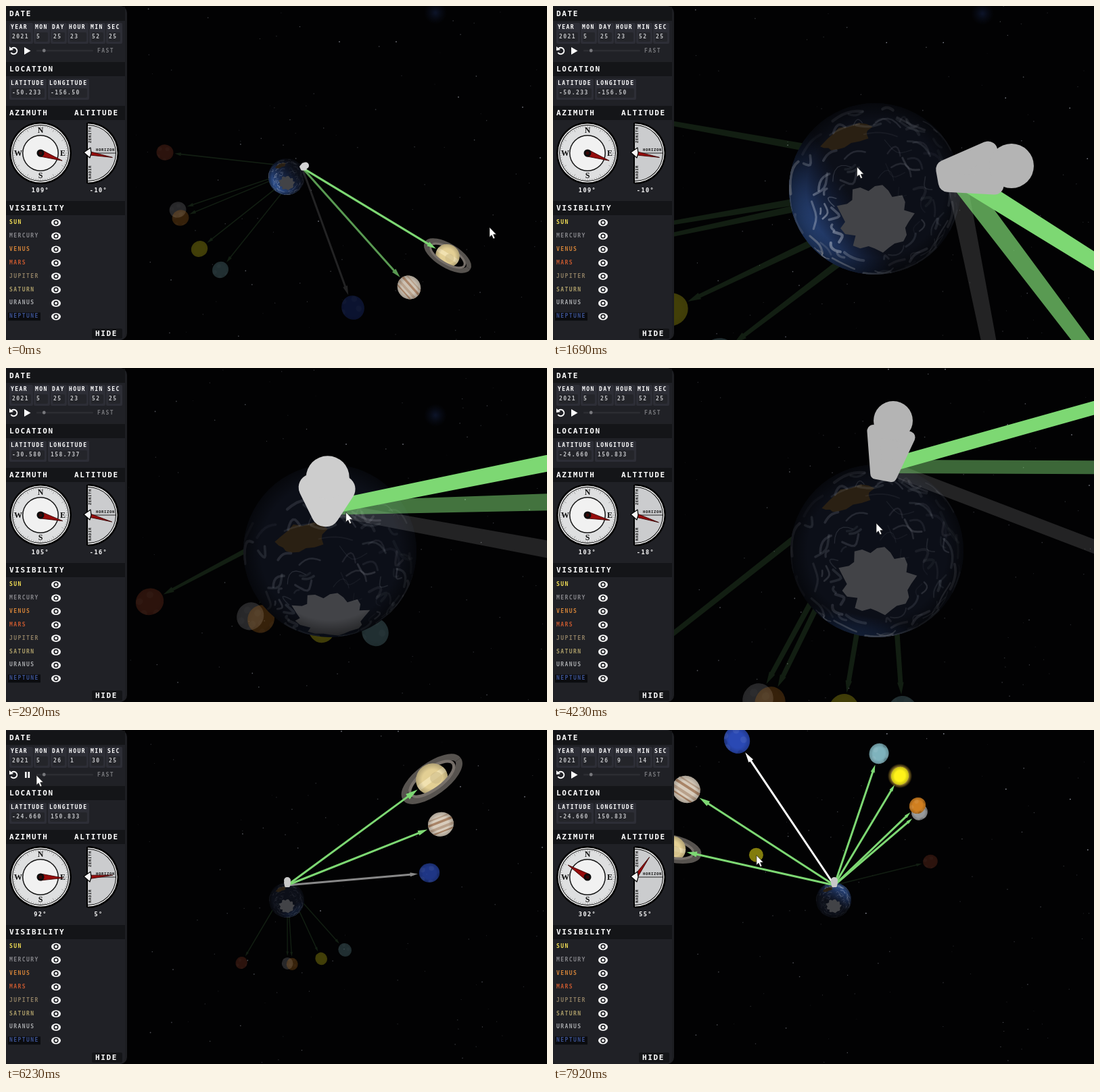
Write an HTML page with a canvas that moves like this. It is 800 px wide and 495 px high and loops after 8000 ms.

```html
<!DOCTYPE html>
<html lang="en">
<head>
<meta charset="utf-8">
<title>Planet finder</title>
<style>
html, body { margin: 0; width: 100%; height: 100%; overflow: hidden; background: #000; }
canvas { display: block; }
</style>
</head>
<body>
<canvas id="stage" width="800" height="495"></canvas>
<script>
const ctx = document.getElementById('stage').getContext('2d');
const LOOP = 8000, STEP = LOOP / 104, RAD = Math.PI / 180, TAU = Math.PI * 2;
const { sin, cos, atan2, hypot, floor } = Math;
const clamp = (v, a, b) => Math.min(b, Math.max(a, v));
const mix = (a, b, u) => a + (b - a) * u;
const mixAll = (a, b, u) => a.map((v, i) => mix(v, b[i], u));

// Piecewise linear track of rows [time, ...values]
function track(rows, t) {
  let i = 0;
  while (i < rows.length - 2 && t >= rows[i + 1][0]) i++;
  const a = rows[i], b = rows[i + 1];
  return mixAll(a, b, clamp((t - a[0]) / (b[0] - a[0]), 0, 1)).slice(1);
}

function seeded(s) {
  return () => (s = (s * 16807) % 2147483647) / 2147483647;
}

// ---- timeline ----
const POSE = [[0, 0], [400, 0], [920, 1], [1550, 2], [1700, 2], [2850, 3], [3450, 3], [4150, 4], [4300, 4], [5050, 5]];
const MINUTES = [[0, 0], [5920, 0], [6230, 98], [7300, 562]];
const PLACE = [[0, -50.233, 203.5], [2500, -50.233, 203.5], [2920, -26.387, 149.187], [3300, -24.66, 150.833]];
const CURSOR = [[0, 715, 328], [120, 715, 328], [600, 436, 233], [1550, 436, 233], [1690, 465, 245],
  [2300, 470, 330], [2500, 590, 250], [2920, 484, 206], [3300, 484, 208], [3500, 480, 310], [4100, 478, 230],
  [5120, 478, 230], [5750, 28, 61], [5950, 28, 61], [6230, 45, 67], [6600, 52, 84], [7000, 44, 78],
  [7250, 28, 61], [7330, 28, 61], [7650, 298, 182], [7920, 302, 187]];
const STARS = [[0, 0, 0], [1600, 0, 0], [2350, 10, 60], [3500, 10, 60], [4150, 3, -51], [7650, 3, -51], [7920, 0, -46]];
const DRAGS = [[1650, 2330], [3500, 4120], [7680, 8000]];

// ---- poses of the scene ----
const GLOBE = [[415, 253, 27], [426, 256, 46], [476, 271, 127], [479, 271, 128], [479, 271, 128], [415, 252, 26]];
const TILT = [22, 22, 22, 54, 22, 22];
const LIGHT = [[.9, .8], [.9, .6], [.85, .36], [.12, .08], [.5, .12], [.3, .3]];
const BEAM = [[3, 3, 1.6], [5.5, 6, 3], [30, 21, 6], [20, 27, 4], [20, 20, 7], [3, 3, 1.5]];
const SIZE = [[18, 12.5], [29, 21], [36, 26], [36, 21], [36, 24], [18, 10]];
// foot x y half, shoulder x y half, head x y r, rounding, grey
const FIGURE = [
  [437, 240, 4, 441, 238, 6, 443, 236.5, 5, 2, 212],
  [462, 237, 7, 472, 232, 11, 477, 229, 10.5, 4, 190],
  [582, 252, 24, 648, 240, 40, 678, 237, 33, 14, 180],
  [472, 215, 21, 474, 178, 42, 475, 162, 32, 20, 205],
  [489, 158, 20, 500, 98, 36, 503, 78, 29, 9, 180],
  [416, 231, 4, 416, 226, 5, 416, 223, 5, 2, 200]];

// ra: degrees east of the sun; at: places in poses 0 to 4; early/late: places while the clock runs
const BODIES = [
  { name: 'mars', ra: 50, dec: 24, color: '#a8482a', at: [235, 217, 142, 199, 60, 153, 213, 347, 100, 455], early: [348, 345], late: [558, 195] },
  { name: 'mercury', ra: 17, dec: 25, color: '#989a9c', at: [254, 302, 165, 333, 120, 331, 362, 368, 303, 491], early: [416, 346], late: [542, 122] },
  { name: 'venus', ra: 12, dec: 24, color: '#d07f20', at: [258, 314, 173, 347, 120, 351, 378, 372, 321, 496], early: [423, 347], late: [539, 112] },
  { name: 'sun', ra: 0, dec: 21, color: '#fff319', at: [286, 360, 222, 422, 174, 450, 468, 386, 430, 507], early: [466, 339], late: [513, 68] },
  { name: 'uranus', ra: -21, dec: 14.7, color: '#7fb3bd', at: [317, 391, 270, 473, 245, 517, 547, 391, 517, 510], early: [501, 326], late: [482, 35] },
  { name: 'neptune', ra: -69, dec: -4, color: '#2a49b4', at: [513, 447, 583, 568, 665, 600, 950, 295, 950, 322], early: [626, 212], late: [272, 15] },
  { name: 'jupiter', ra: -88.5, dec: -12.3, color: '#d8ccbc', at: [596, 417, 716, 520, 860, 600, 1000, 192, 1000, 148], early: [643, 140], late: [197, 88] },
  { name: 'saturn', ra: -111, dec: -18, color: '#e3cf94', at: [653, 370, 808, 443, 1000, 504, 1050, 89, 1000, 3], early: [630, 73], late: [176, 176] }];
const EARLY = 24.5, LATE = 140.5;

// Place of a body in the wide view after the sky has turned by `turn` degrees
function orbit(b, turn) {
  const f = (b.ra + 179.5 - turn) * RAD, d = b.dec * RAD, a = 22 * RAD;
  const x = cos(d) * sin(f);
  const y = sin(d) * sin(a) + cos(d) * cos(f) * cos(a);
  const z = -sin(d) * cos(a) + cos(d) * cos(f) * sin(a);
  const s = 193 / (1 - .77 * z);
  return [416 + s * x, 240 - s * y, s * .073];
}
function wide(b, turn) {
  const p = orbit(b, turn), e = orbit(b, EARLY), l = orbit(b, LATE);
  const u = clamp((turn - EARLY) / (LATE - EARLY), 0, 1);
  for (let i = 0; i < 2; i++) p[i] += mix(b.early[i] - e[i], b.late[i] - l[i], u);
  return p;
}

// Azimuth and altitude seen by the figure
function sight(b, turn, lat) {
  const h = (turn - 180.4 - b.ra) * RAD, d = b.dec * RAD, p = lat * RAD;
  return {
    alt: Math.asin(sin(p) * sin(d) + cos(p) * cos(d) * cos(h)) / RAD,
    az: (atan2(-sin(h) * cos(d), sin(d) * cos(p) - cos(d) * cos(h) * sin(p)) / RAD + 360) % 360
  };
}

// ---- drawing helpers ----
function disc(x, y, r, fill) {
  ctx.beginPath(); ctx.arc(x, y, Math.max(r, 0), 0, TAU);
  ctx.fillStyle = fill; ctx.fill();
}
function poly(pts, fill) {
  ctx.beginPath(); pts.forEach(p => ctx.lineTo(p[0], p[1])); ctx.closePath();
  ctx.fillStyle = fill; ctx.fill();
}
function box(x, y, w, h, fill, r = 0) {
  ctx.beginPath(); ctx.roundRect(x, y, w, h, r);
  ctx.fillStyle = fill; ctx.fill();
}
function label(s, x, y, size, color, align = 'left') {
  ctx.font = `bold ${size}px "DejaVu Sans Mono", monospace`;
  ctx.letterSpacing = (size > 10 ? 1.6 : 1.45) + 'px';
  ctx.textAlign = align; ctx.textBaseline = 'middle';
  ctx.fillStyle = color; ctx.fillText(s, x, y);
  ctx.letterSpacing = '0px';
}

// ---- sky ----
const rnd = seeded(417);
const faint = Array.from({ length: 130 }, () => [rnd() * 800, rnd() * 495, .12 + rnd() * .3, .4 + rnd() * .5]);
const bright = [[493, 53], [764, 150], [577, 53], [462, 319], [790, 225], [669, 135]].map(p => [...p, .75, .8]);

function sky(t) {
  const [dx, dy] = track(STARS, t);
  for (const [x, y, a, r] of [...faint, ...bright])
    disc((x + dx + 800) % 800, (y + dy + 495) % 495, r, `rgba(215,220,235,${a})`);
  const haze = ctx.createRadialGradient(635, 10 + dy, 1, 635, 10 + dy, 17);
  haze.addColorStop(0, '#0c1327'); haze.addColorStop(1, 'rgba(8,12,25,0)');
  disc(635, 10 + dy, 17, haze);
}

// ---- globe ----
const rc = seeded(92);
const clouds = Array.from({ length: 110 }, () =>
  ({ c: 28 + rc() * 68, a: rc() * 360, len: 5 + rc() * 22, bend: (rc() - .5) * 16, w: .008 + rc() * .026, o: .06 + rc() * .2 }));
const coast = Array.from({ length: 30 }, (_, i) => [21 + 4 * sin(i * 1.9) + rc() * 5, i * 12]);
const island = Array.from({ length: 18 }, (_, i) => {
  const q = i / 18 * TAU, r = 1 + (rc() - .5) * .4;
  return [65 + 9 * r * sin(q), -22 + 19 * r * cos(q)];
});

function globe([gx, gy, R], tilt, [power, reach], sun) {
  const a = tilt * RAD;
  const onSphere = (c, f) => {
    c *= RAD; f *= RAD;
    return [sin(c) * sin(f), -(sin(c) * cos(f) * cos(a) - cos(c) * sin(a)), sin(c) * cos(f) * sin(a) + cos(c) * cos(a)];
  };
  const ux = sun[0] - gx, uy = sun[1] - gy, n = hypot(ux, uy) || 1;
  const ramp = (near, far, to) => {
    const g = ctx.createLinearGradient(ux / n, uy / n, ux / n * (1 - 2 * to), uy / n * (1 - 2 * to));
    g.addColorStop(0, near); g.addColorStop(1, far);
    return g;
  };
  ctx.save();
  ctx.translate(gx, gy); ctx.scale(R, R);
  disc(0, 0, 1, '#0c0f18');
  ctx.beginPath(); ctx.arc(0, 0, 1, 0, TAU); ctx.clip();
  ctx.globalAlpha = power;
  ctx.fillStyle = ramp('#3a66b4', 'rgba(25,45,95,0)', reach); ctx.fillRect(-1, -1, 2, 2);
  ctx.globalAlpha = 1;
  poly(island.map(p => onSphere(...p)), '#2a2013');
  poly(coast.map(p => onSphere(...p)), '#424347');
  const veil = (color, gain) => {
    ctx.strokeStyle = color; ctx.lineCap = 'round';
    for (const k of clouds) {
      if (onSphere(k.c, k.a)[2] < 0) continue;
      ctx.globalAlpha = Math.min(1, k.o * gain); ctx.lineWidth = k.w;
      ctx.beginPath();
      for (let i = 0; i < 7; i++) {
        const p = onSphere(k.c + k.bend * sin(i / 2), k.a + k.len * i / 6);
        ctx.lineTo(p[0], p[1]);
      }
      ctx.stroke();
    }
    ctx.globalAlpha = 1;
  };
  veil('#9da2ad', .8);
  veil(ramp('#eef2fa', 'rgba(220,230,245,0)', reach), 2.6 * power);
  const edge = ctx.createRadialGradient(0, 0, .8, 0, 0, 1);
  edge.addColorStop(0, 'rgba(0,0,0,0)'); edge.addColorStop(1, 'rgba(0,0,0,.5)');
  ctx.fillStyle = edge; ctx.fillRect(-1, -1, 2, 2);
  ctx.restore();
}

// ---- bodies and pointers ----
function pointer(from, to, r, w0, w1, color, alpha) {
  const dx = to[0] - from[0], dy = to[1] - from[1], n = hypot(dx, dy) || 1;
  const ux = dx / n, uy = dy / n, end = n - r - 2, head = r * .75;
  const at = (d, s) => [from[0] + ux * d - uy * s, from[1] + uy * d + ux * s];
  const neck = end - head, wide = Math.max(r * .2, w1 * .5 + 1);
  ctx.globalAlpha = alpha;
  poly([at(0, w0 / 2), at(neck, w1 / 2), at(neck, wide), at(end, 0),
    at(neck, -wide), at(neck, -w1 / 2), at(0, -w0 / 2)], color);
  ctx.globalAlpha = 1;
}

function ring(x, y, r, rot, back) {
  ctx.save();
  ctx.translate(x, y); ctx.rotate(rot);
  for (const [k, w, c] of [[1.98, .4, '#57534f'], [1.6, .18, '#77706a']]) {
    ctx.beginPath();
    ctx.ellipse(0, 0, r * k, r * k * .4, 0, back ? Math.PI : 0, back ? TAU : Math.PI);
    ctx.strokeStyle = c; ctx.lineWidth = r * w; ctx.stroke();
  }
  ctx.restore();
}

function body(b, [x, y, r], vis, rot) {
  ctx.globalAlpha = clamp(.1 + vis * 1.2, 0, 1);
  if (b.name === 'sun' && vis > .3) {
    const g = ctx.createRadialGradient(x, y, r * .9, x, y, r * 1.35);
    g.addColorStop(0, 'rgba(255,225,90,.7)'); g.addColorStop(1, 'rgba(255,190,40,0)');
    disc(x, y, r * 1.35, g);
  }
  if (b.name === 'saturn') ring(x, y, r, rot, true);
  ctx.save();
  ctx.translate(x, y); ctx.rotate(rot); ctx.scale(1, .93);
  disc(0, 0, r, b.color);
  ctx.clip();
  if (b.name === 'jupiter')
    [[-.62, .12], [-.3, .2], [.15, .22], [.55, .12]].forEach(([p, h], i) =>
      box(-r, p * r, 2 * r, h * r, i % 2 ? '#a98467' : '#b9a18b'));
  else if (b.name === 'saturn') {
    box(-r, -.2 * r, 2 * r, .35 * r, 'rgba(255,243,205,.5)');
    disc(.25 * r, .1 * r, r * .38, 'rgba(205,187,135,.6)');
  } else if (b.name !== 'sun') {
    const spots = seeded(77);
    for (let i = 0; i < 8; i++)
      disc((spots() * 2 - 1) * r, (spots() * 2 - 1) * r, r * .25, i % 2 ? 'rgba(255,255,255,.07)' : 'rgba(0,0,0,.12)');
  }
  const shade = ctx.createRadialGradient(0, 0, r * .6, 0, 0, r);
  shade.addColorStop(0, 'rgba(0,0,0,0)'); shade.addColorStop(1, 'rgba(0,0,0,.22)');
  disc(0, 0, r, shade);
  ctx.restore();
  if (b.name === 'saturn') ring(x, y, r, rot, false);
  ctx.globalAlpha = 1;
}

function figure([fx, fy, fw, sx, sy, sw, hx, hy, hr, round, grey]) {
  const n = hypot(sx - fx, sy - fy) || 1, px = -(sy - fy) / n, py = (sx - fx) / n;
  const f = Math.max(fw - round, .5), s = Math.max(sw - round, .5);
  const color = `rgb(${grey},${grey},${grey})`;
  poly([[fx + px * f, fy + py * f], [sx + px * s, sy + py * s], [sx - px * s, sy - py * s], [fx - px * f, fy - py * f]], color);
  ctx.strokeStyle = color; ctx.lineWidth = round * 2; ctx.lineJoin = 'round'; ctx.stroke();
  disc(hx, hy, hr, color);
}

function scene(t, turn, lat) {
  const [k] = track(POSE, t), i = Math.min(floor(k), 4), v = k - i;
  // A change of zoom grows by ratio, not by steps
  const q = GLOBE[i + 1][2] / GLOBE[i][2];
  const u = Math.abs(q - 1) < .05 ? v : (q ** v - 1) / (q - 1);
  const at = rows => mixAll(rows[i], rows[i + 1], u);
  const run = clamp((turn - EARLY) / (LATE - EARLY), 0, 1);
  const man = at(FIGURE), g = at(GLOBE), beam = at(BEAM), size = at(SIZE);
  let light = at(LIGHT);
  if (k === 5) light = mixAll(light, [.9, .6], run);

  const items = BODIES.map((b, n) => {
    const key = j => j < 5 ? [b.at[2 * j], b.at[2 * j + 1], SIZE[j][n > 4 ? 0 : 1]] : wide(b, turn);
    const pos = mixAll(key(i), key(i + 1), u);
    const vis = clamp(.45 + (sight(b, turn, lat).alt - 3) * .05, .13, 1);
    const lift = n > 4 || (k === 5 && vis > .3);
    return { b, pos, vis, near: lift };
  });
  const from = [mix(man[0], man[3], .2), mix(man[1], man[4], .2)];
  const show = ({ b, pos, vis, near }) => {
    const rot = Math.atan((pos[1] - from[1]) / (pos[0] - from[0] || 1));
    const color = b.name === 'neptune' ? '#ffffff' : '#7dd873';
    const w0 = near ? beam[0] : beam[0] * .5, w1 = near ? beam[1] : beam[2];
    const draw = () => pointer(from, pos, pos[2], w0, w1, color, vis);
    if (b.name === 'saturn') { body(b, pos, vis, rot); draw(); }
    else { draw(); body(b, pos, vis, rot); }
  };
  sky(t);
  items.filter(o => !o.near).forEach(show);
  globe(g, mix(TILT[i], TILT[i + 1], u), light, items[3].pos);
  items.filter(o => o.near).forEach(show);
  figure(man);
}

// ---- side panel ----
const ROWS = [['SUN', '#f0dc55'], ['MERCURY', '#85858a'], ['VENUS', '#cf8138'], ['MARS', '#c4582f'],
  ['JUPITER', '#8c7d62'], ['SATURN', '#aa9c68'], ['URANUS', '#a5a7aa'], ['NEPTUNE', '#3c5292']];

function header(s, y, h, x2, s2) {
  box(0, y, 176, h, '#141518');
  label(s, 5, y + h / 2 + .5, 11, '#fff');
  if (s2) label(s2, x2, y + h / 2 + .5, 11, '#fff');
}
function field(name, value, x, y, w) {
  box(x, y, w, 31, '#2d2e36', 2);
  box(x + 3, y + 14, w - 6, 14, '#24252a', 2);
  label(name, x + 2, y + 6.5, 8, '#fff');
  label(value, x + 4, y + 20.5, 8, '#c2c3c6');
}
function needle(x, y, angle, len, half) {
  ctx.save();
  ctx.translate(x, y); ctx.rotate(angle);
  poly([[0, -half], [len, 0], [0, half]], '#960c0c');
  ctx.strokeStyle = '#330000'; ctx.lineWidth = .8; ctx.stroke();
  ctx.restore();
}

function compass(az) {
  disc(51, 218, 46, '#000'); disc(51, 218, 43.5, '#f2f2f2'); disc(51, 218, 42, '#000'); disc(51, 218, 41, '#dedfe0');
  for (let i = 0; i < 72; i++) {
    const a = i * 5 * RAD, r = i % 6 ? 38.5 : 36;
    ctx.beginPath(); ctx.moveTo(51 + 41 * cos(a), 218 + 41 * sin(a)); ctx.lineTo(51 + r * cos(a), 218 + r * sin(a));
    ctx.strokeStyle = '#888'; ctx.lineWidth = .6; ctx.stroke();
  }
  disc(51, 218, 27, '#111'); disc(51, 218, 25.5, '#f1f1f1');
  ctx.font = 'bold 12px "Liberation Serif", serif';
  ctx.textAlign = 'center'; ctx.textBaseline = 'middle'; ctx.fillStyle = '#111';
  [['N', 51, 185], ['E', 84, 219], ['S', 51, 252], ['W', 18, 219]].forEach(p => ctx.fillText(...p));
  needle(51, 218, (az - 90) * RAD, 34, 5);
  disc(51, 218, 5.5, '#0c0c0c'); disc(51, 218, 2.5, '#3a0606');
}

function dial(alt) {
  for (const [r, c] of [[46, '#000'], [43.5, '#ededed'], [42, '#000'], [41, '#cbccce']]) {
    ctx.beginPath(); ctx.arc(121, 218, r, -Math.PI / 2, Math.PI / 2); ctx.closePath();
    ctx.fillStyle = c; ctx.fill();
  }
  box(119, 173, 2, 90, '#000');
  box(121, 217.5, 41, 1, '#222');
  ctx.font = 'bold 5.5px "DejaVu Sans Mono", monospace';
  ctx.textBaseline = 'middle'; ctx.textAlign = 'center'; ctx.fillStyle = '#111';
  ctx.letterSpacing = '.7px';
  ctx.fillText('HORIZON', 147, 214);
  for (const [s, y] of [['ZENITH', 191], ['NADIR', 246]]) {
    ctx.save(); ctx.translate(125, y); ctx.rotate(-Math.PI / 2); ctx.fillText(s, 0, 0); ctx.restore();
  }
  ctx.letterSpacing = '0px';
  needle(122, 218, -alt * RAD, 36, 2.8);
  poly([[115, 217], [125, 210], [126, 218], [124, 225]], '#f6f6f6');
  ctx.strokeStyle = '#000'; ctx.lineWidth = 1.2; ctx.stroke();
}

function eye(y) {
  ctx.beginPath(); ctx.ellipse(74, y, 7, 5.3, 0, 0, TAU); ctx.fillStyle = '#fff'; ctx.fill();
  disc(74, y, 3.7, '#1b1c20'); disc(74, y, 2, '#fff');
}

function panel(t, mins, turn, lat, lon) {
  box(-10, 0, 189, 495, '#1d1e22', 10);
  box(0, 0, 176, 495, '#202126', 8);
  header('DATE', 1, 21);
  header('LOCATION', 83, 21);
  header('AZIMUTH', 148, 21, 101, 'ALTITUDE');
  header('VISIBILITY', 289, 21);
  const clock = 23 * 60 + 52 + floor(mins), d = floor(clock / 1440);
  [['YEAR', 2021, 5, 35], ['MON', 5, 41, 24], ['DAY', 25 + d, 66, 24], ['HOUR', floor(clock / 60) % 24, 91, 31],
    ['MIN', clock % 60, 123, 24], ['SEC', mins < 562 ? 25 : 17, 148, 24]]
    .forEach(([n, v, x, w]) => field(n, String(v), x, 25, w));
  field('LATITUDE', lat.toFixed(3).slice(0, 7), 5, 108, 55);
  field('LONGITUDE', (lon > 180 ? lon - 360 : lon).toFixed(3).slice(0, 7), 62, 108, 61);

  ctx.beginPath(); ctx.arc(11.5, 66.5, 4.8, -2.3, 2.6);
  ctx.strokeStyle = '#fff'; ctx.lineWidth = 2; ctx.lineCap = 'butt'; ctx.stroke();
  poly([[5, 60], [11, 65], [5, 66]], '#fff');
  if (t >= 5880 && t < 7300) { box(28, 62, 2.6, 9, '#fff'); box(32.5, 62, 2.6, 9, '#fff'); }
  else poly([[27, 61], [36.5, 66.5], [27, 72]], '#fff');
  box(45, 65, 84, 2.5, '#2c2d32', 1);
  box(54, 63.5, 4.5, 5, '#77787c', 2);
  label('FAST', 135, 66.5, 8, '#77787c');

  const view = sight(BODIES[5], turn, lat);
  compass(view.az); dial(view.alt);
  label(Math.round(view.az) + '°', 51, 274, 8.5, '#fff', 'center');
  label(Math.round(view.alt) + '°', 137, 274, 8.5, '#fff', 'center');
  ROWS.forEach(([s, c], i) => {
    const y = 321 + i * 19.9;
    if (i === 7) box(3, y - 6, 48, 12, '#0b0c0f');
    label(s, 5, y, 8, c); eye(y);
  });
  box(127, 478, 45, 15, '#141518', 2);
  label('HIDE', 132, 486, 11, '#fff');
}

function cursor(t) {
  const [x, y] = track(CURSOR, t);
  if (DRAGS.some(([a, b]) => t >= a && t < b)) disc(x - .5, y - .5, 10.5, '#827c0c');
  const shape = [[0, 0], [0, 14.5], [3.2, 11.6], [5.6, 17], [8, 16], [5.7, 10.7], [10, 10.4]];
  poly(shape.map(p => [x + p[0], y + p[1]]), '#fff');
  ctx.strokeStyle = '#222'; ctx.lineWidth = .7; ctx.stroke();
}

function frame(now) {
  const t = floor((now % LOOP) / STEP + .01) * STEP;
  const [mins] = track(MINUTES, t), [lat, lon] = track(PLACE, t), turn = mins / 4;
  ctx.fillStyle = '#020203'; ctx.fillRect(0, 0, 800, 495);
  scene(t, turn, lat);
  panel(t, mins, turn, lat, lon);
  cursor(t);
}

const start = performance.now();
function loop() {
  frame(performance.now() - start);
  requestAnimationFrame(loop);
}
loop();
</script>
</body>
</html>
```
